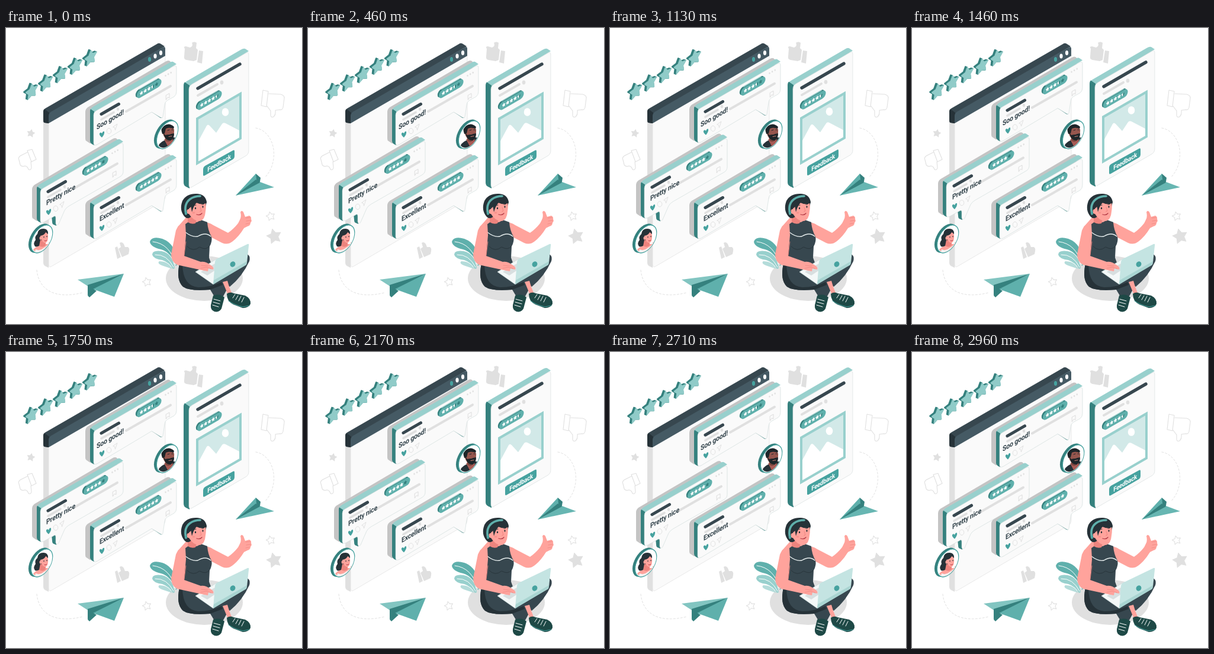
Animation, 500 px wide and 500 px high, one loop 3 s. Source, as an HTML page:

```html
<!DOCTYPE html>
<html lang="en">
<head>
<meta charset="utf-8">
<title>Customer feedback</title>
<style>
html, body { margin: 0; width: 100%; height: 100%; overflow: hidden; background: #fff; }
svg { display: block; width: 100%; height: 100%; }
text { font-family: Roboto, "Liberation Sans", sans-serif; font-weight: 600; letter-spacing: -.25px; }
</style>
</head>
<body>
<svg id="stage" viewBox="0 0 500 500"></svg>
<script>
const teal = '#46a29f', mid = '#5fb0ac', light = '#98d0cd', dark = '#35817e', navy = '#37474f',
  slate = '#455a64', ink = '#263238', grey = '#e0e0e0', paper = '#fafafa',
  skin = '#ffa39c', blush = '#ed847e', shoe = '#1e4946';

const path = (d, fill, extra = '') => `<path d="${d}" fill="${fill}" ${extra}/>`;
const line = (d, color, width, extra = '') =>
  path(d, 'none', `stroke="${color}" stroke-width="${width}" stroke-linecap="round" stroke-linejoin="round" ${extra}`);
const oval = (x, y, rx, ry, fill, extra = '') =>
  `<ellipse cx="${x}" cy="${y}" rx="${rx}" ry="${ry}" fill="${fill}" ${extra}/>`;
const move = (x, y, body) => `<g transform="translate(${x} ${y})">${body}</g>`;
const iso = (x, y, body) => `<g transform="matrix(.866 -.5 0 1 ${x} ${y})">${body}</g>`;
const label = (x, y, size, color, text, anchor = 'start') =>
  iso(x, y, `<text font-size="${size}" fill="${color}" text-anchor="${anchor}">${text}</text>`);

function star(r, half = false) {
  const points = [];
  for (let i = half ? 5 : 0; i <= (half ? 10 : 9); i++) {
    const a = i * Math.PI / 5, q = i % 2 ? r * 0.52 : r;
    points.push((q * Math.sin(a)).toFixed(2) + ' ' + (-q * Math.cos(a)).toFixed(2));
  }
  return 'M' + points.join('L') + 'Z';
}

function badge(x, y, score) {
  const pill = fill => `<rect x="-24" y="-6.5" width="48" height="13" rx="6.5" fill="${fill}"/>`;
  let out = iso(x - 1.4, y - .8, pill(dark) + line('M-16 -5.8H18', light, 1.4)) + iso(x + .8, y + .4, pill(mid));
  for (let i = 0; i < 5; i++) {
    const left = score - i;
    out += iso(x + .6 + (i - 2) * 6.4, y - (i - 2) * 3.7 + .5,
      path(star(3.7), left >= 1 ? '#fff' : dark) +
      (left === .5 ? path(star(3.7, true), '#fff') : ''));
  }
  return out;
}

function card(title, titleX, score, tailLeft) {
  const front = tailLeft
    ? 'V111Q288 117 283 120L196 170Q191 173 189 177L179 200Q175 205 174 199V190Q174 185 170 188L154 197'
    : 'V107Q288 113 284 116L273 122Q268 125 268 130L265 150Q264 153 261 151L246 142L154 197';
  const tailSide = tailLeft
    ? 'M167 186L175 183V203L170 201Q168 200 168 196Z' : 'M245 141L251 138L264 152L261 152Z';
  return path('M134 142Q134 137 138 134L269 57Q275 53 278 57V100L142 195L136 191Q134 190 134 187Z', '#c4c4c4') +
    path(tailSide, dark) +
    path('M142 141Q142 136 147 133L278 57.500Q281 56 283 57.500L288 61L153 142L148 146Z', light) +
    path('M142 140Q142 138 143 137L149 141V198L145 196Q142 194 142 191Z', dark) +
    path(`M148 147Q148 142 152 140L283 64.500Q288 62 288 67${front}Q148 200 148 194Z`, paper,
      'stroke="#cbd8d7" stroke-width=".6"') +
    line('M161 145.5L190.500 128.500', navy, 5) +
    line('M161 154.500L182 142.500', grey, 3.6) + oval(189, 137, 2.2, 2.8, grey) +
    line('M203 141L278 98', grey, 4) +
    badge(241, 102, score) +
    [0, 1, 2].map(i => oval(269.5 + i * 4.6, 80.5 - i * 2.6, 1.2, 1.6, grey)).join('') +
    line('M270.5 113.500L276 110.500V118L273.300 117L270.500 121Z', '#d6d6d6', .8) +
    label(titleX, 169 - (titleX - 158) * .577, 12.2, navy, title) +
    path('M162 185Q157 181 158 178Q160 175 162 178Q164 173 166 175Q167 179 162 185Z', teal) +
    oval(174, 174, 3.8, 4.6, 'none', 'stroke="#dedede" stroke-width=".9"') +
    line('M181 167L188 162L184.500 172.500L183.500 168.500Z', '#dedede', .9);
}

function browser() {
  return path('M63 156L72 160V405L66 402Q63 400 63 396Z', grey) +
    path('M72 160L269 46V283Q269 290 264 293L78 402Q72 406 72 399Z', paper, 'stroke="#e0e0e0" stroke-width=".7"') +
    path('M63 142Q63 138 66 136L255 27Q258 25 261 26.500L268 31L74 145L72 161L65 160Q63 159 63 156Z', navy) +
    path('M63 142Q63 138 65 137L73 143L72 161L65 160Q63 159 63 156Z', ink) +
    path('M72 149Q72 144 76 141.500L264 33Q269 30 269 35V47L72 161Z', slate) +
    oval(242.5, 53, 2.6, 4, teal) + oval(252, 47.5, 2.6, 4, '#fff') + oval(261.5, 42, 2.6, 4, '#fff');
}

function feedback() {
  return path('M300 98Q300 93 305 90L397 36.500Q401 34 404 35L410 39L316 97L309 102Z', light) +
    path('M300 98Q300 93 302 91.500L310 97V271L304 268Q300 266 300 261Z', dark) +
    path('M309 104Q309 98 314 95L405 42.500Q410 39 410 45V207Q410 213 405 216L315 268Q309 272 309 265Z',
      paper, 'stroke="#d9dfdf" stroke-width=".7"') +
    line('M324 102L395 61', navy, 5.4) +
    line('M324 114L357 95', grey, 4) + oval(364.5, 92, 2.8, 3.4, grey) +
    badge(343, 122, 4.5) +
    path('M321 152L398 107.500V187.500L321 232Z', light) +
    path('M325 154.500L394 114.500V185L325 225Z', '#d2e9e8') +
    path('M325 191L339 165Q341 162 344 165L355 177L365 162Q367 159 371 161L394 173V185L325 225Z', '#fff') +
    oval(370.5, 142, 5.8, 6.8, '#fff') +
    path('M333 238Q333 235 336 233L383 207Q386 205 386 208V217Q386 220 383 222L336 249Q333 251 333 248Z', teal) +
    label(360, 232, 11, '#fff', 'Feedback', 'middle');
}

function avatar(x, y, face) {
  return iso(x - 2, y - .8, `<circle r="22" fill="${dark}"/>`) +
    iso(x + 1.6, y + .4, `<circle r="21" fill="#fff" stroke="${teal}" stroke-width="1.300"/>`) +
    `<clipPath id="clip${x}"><circle r="19.500" transform="matrix(.866 -.5 0 1 ${x + 1.6} ${y + .4})"/></clipPath>` +
    `<g clip-path="url(#clip${x})">${face}</g>`;
}

const man = path('M252 211L259 196Q264 191 269 189L281 185Q287 184 295 188V212Z', ink) +
  path('M267 188L280 184L282 190L275 203Z', '#a95b55') +
  path('M268 184L280 181V189Q276 194 270 191Z', '#7a463f') +
  path('M265 171Q267 164 277 165Q285 166 284 176Q284 186 277 189Q268 189 265 179Z', '#96564e') +
  path('M264 179Q260 169 267 165Q276 159 284 167L283 170Q275 167 270 170L268 178Z', '#1d2529') +
  path('M266 177L269 181Q272 180 276 180Q281 178 284 178Q284 187 278 190Q268 190 266 177Z', '#1d2529') +
  line('M275 183.500L280 182.500', '#c77c72', 1.2) +
  line('M273 173L276 172M280 172L282 172', '#1d2529', 1);

const girl = path('M50 358Q48 352 53 348Q54 339 63 339Q71 339 71 347L66 357L60 366Q56 371 49 369Q45 364 50 358Z', ink) +
  path('M43 381Q45 371 56 368L66 365Q77 364 81 369V388H43Z', skin) +
  path('M46 388L50 374Q57 377 63 372L70 367L78 364V388Z', '#f4f4f4') +
  path('M58 358L67 360V367Q63 372 56 368Z', blush) +
  path('M58 351Q65 350 67 345Q72 347 71 355Q70 363 66 363Q60 362 58 351Z', skin) +
  oval(58.5, 355, 2, 2.8, skin) +
  line('M64 352.500v1.200M69 351.500v1.200', ink, 1.2) + line('M65 359.500q2 1 4-1', '#b53d48', 1) +
  line('M67 371q5-2 6-9', blush, 1.2);

function thumbs() {
  const outline = d => line(d, grey, 1.1);
  return path('M302 35Q299 31 304 31L311 33Q317 30 314 25Q318 22 322 25L321 34L324 37L322 54L317 56L305 54Q300 53 301 48ZM326 38L333 39L331 60L323 58Z', grey) +
    path('M184 371L188 369L194 387L188 390ZM190 373L194 370L192 363Q196 360 199 365L201 370L206 370Q209 372 208 377L207 382L196 387Z', grey) +
    outline('M434 105L443 107L440 133L431 131ZM444 111L464 112Q471 114 470 119L468 134Q467 139 462 138L455 139Q456 146 452 150Q447 152 447 147L447 140L441 132') +
    outline('M36 207L44 205L51 222L43 226ZM36 210L24 216Q20 219 22 223L24 231Q26 235 32 233Q36 233 38 239Q42 241 43 236L42 226');
}

function scenery() {
  const face = '#90cbc8', join = c => `stroke="${c}" stroke-width="2" stroke-linejoin="round"`;
  let out = '';
  for (let i = 0; i < 5; i++) {
    const x = 42.5 + i * 24.9, y = 107 - i * 14.2;
    out += [3, 2, 1, 0].map(k => iso(x - k + .5, y - k * .4, path(star(12.2), dark, join(dark)))).join('') +
      iso(x + 1, y, path(star(11.8), face, join(face)));
  }
  const spot = (x, y, r, turn, solid) =>
    `<g transform="translate(${x} ${y}) rotate(${turn})">${path(star(r), solid ? grey : 'none',
      `stroke="${grey}" stroke-width="1.100" stroke-linejoin="round"`)}</g>`;
  return out + spot(42, 178, 6.4, 12, true) + spot(453, 352, 12.8, -14, true) +
    spot(238, 429, 7.6, -14, false) + spot(447, 318, 7.6, -14, false) +
    line('M422 169C445 173 457 201 451 226C449 237 444 245 437 253', grey, 1, 'stroke-dasharray="3 3"') +
    line('M52 409C55 438 77 460 130 447', grey, 1, 'stroke-dasharray="3 3"');
}

function planes() {
  return path('M388 283L422 246L430 263Z', mid) +
    path('M422 246L430 253L428 266L424 264Z', dark) +
    path('M388 283L429 260L453 269Z', '#67b6b2') +
    path('M388 283L422 256L429 261Z', dark) +
    path('M121 425L199 415L138 436Z', '#82c5c1') +
    path('M138 434L199 415L147 444L138 452Z', dark) +
    path('M147 441L199 415L183 454Z', mid) +
    path('M138 452L147 441L153 444L141 455Z', dark);
}

function plant() {
  return path('M289 400Q289 365 264 356Q246 351 243 361Q244 370 262 374Q279 379 287 402Z', mid) +
    path('M285 406Q282 381 263 377Q247 375 247 383Q249 390 264 392Q276 396 282 407Z', light) +
    path('M281 407Q274 394 259 394Q254 398 266 402Z', '#b4dcda') +
    line('M248 361Q277 364 287 400M252 383Q272 382 283 404', '#fff', 1);
}

function legs() {
  const laces = d => line(d, '#fff', 1);
  return path('M293 398Q287 426 299 437Q310 445 345 442L351 452L367 453L374 440L366 428L340 400Z', navy) +
    path('M293 398Q287 426 299 437Q310 445 345 442L366 434L364 429Q346 438 325 438Q299 436 298 400Z', ink) +
    path('M340 400L398 381Q415 380 411 394Q399 420 378 437L364 428Z', navy) +
    path('M366 429L374 427L377 437L381 447L375 451L371 441Z', skin) +
    path('M350 452Q361 448 369 455L364 474Q360 481 352 479Q345 476 346 468Z', shoe) +
    path('M373 449Q378 445 384 448L404 452Q414 457 413 466Q410 473 400 473L384 467Q373 462 373 449Z', shoe) +
    laces('M351 458l11 3M350 463l11 3M349 468l10 3') +
    laces('M383 456l4-6M388 459l4-7M393 461l4-8M398 463l4-8') +
    line('M376 461Q386 468 400 471L411 469', teal, 1);
}

function person() {
  return oval(335, 423, 65, 38, grey) + plant() +
    // raised arm
    path('M333 328Q343 328 350 333L375 346Q384 340 392 330L402 338Q393 353 382 361Q374 367 365 363L340 350Z', skin) +
    path('M391 332L395 324Q398 319 396 311Q398 307 401 311L404 319L411 317Q415 319 414 323Q416 326 413 329Q413 334 408 335L400 339Z', skin) +
    line('M405 321l7-1M406 326l7-1M405 331l6-1', blush, .7) +
    legs() +
    // torso
    path('M306 318L319 315L329 325L336 332L304 342L290 336Z', skin) +
    path('M302 332L309 327Q320 332 329 324L340 328Q341 342 347 352Q349 360 344 369L343 388L347 399Q319 413 292 399L301 368Q304 350 302 332Z', navy) +
    line('M303 345Q315 354 324 352Q337 344 346 352', '#e7eeee', 1.3) +
    line('M306 369Q316 379 327 370Q338 376 343 369', ink, .8) +
    // laptop
    path('M320 412L356 390L382 407L350 433Z', '#f4f8f8', 'stroke="#c9dad9" stroke-width=".7"') +
    path('M329 412L356 396L364 402L340 418Z', '#d8dfe0') +
    path('M353 395Q353 392 356 390L408 365Q411 364 410 368L407 396Q407 399 404 401L350 433Z', '#c4e4e2') +
    path('M351 426L407 394L406 400L350 433Z', '#a9d4d1') +
    oval(383, 399, 4.3, 4.8, teal, 'transform="rotate(35 383 399)"') +
    // resting arm
    path('M303 331Q291 330 287 342L279 382Q279 395 289 400L326 408Q335 410 341 411L342 406L350 408Q352 404 345 400Q337 394 329 395L301 385L304 350Z', skin) +
    line('M329 406L338 404L347 407M330 401L341 402', blush, .7) +
    line('M301 384L304 361', blush, .8) +
    // head
    path('M307 315L323 320L320 330Q313 332 307 328Z', blush) +
    path('M302 319Q292 308 298 292Q305 279 323 280Q337 281 339 294L337 302L311 320Q306 323 302 319Z', ink) +
    path('M309 305Q316 300 317 294Q328 298 336 293Q339 300 337 310Q336 324 328 326Q317 327 309 314Z', skin) +
    path('M313 305Q309 289 321 285Q336 283 339 295Q331 300 322 295Q317 300 314 311Z', ink) +
    line('M304 314Q300 297 311 289Q318 284 328 284', mid, 3.6) +
    oval(308.500, 310, 3, 4, skin) + oval(304.500, 312, 1.6, 2.2, teal) +
    oval(320, 304.500, 1.2, 1.7, ink) + oval(332.500, 302, 1.1, 1.7, ink) +
    line('M317 300.500q2-2 4-1.500M331 298l3-.500', ink, 1) +
    line('M328 303L330 309L327.500 310', blush, .9) +
    line('M322 315Q328 317 331 313', '#b53d48', 1.3) +
    oval(317, 312, 2.3, 1.6, blush, 'opacity=".5"');
}

const float = (delay, body) => `<g data-delay="${delay}">${body}</g>`;
const stage = document.getElementById('stage');
stage.innerHTML = scenery() + thumbs() + planes() + browser() +
  float(500, card('Soo good!', 153, 3.5, false)) +
  float(1500, move(0, 158, card('Excellent', 158, 5, false))) +
  float(0, move(-90, 131, card('Pretty nice', 158, 4, true))) +
  float(1000, feedback()) +
  avatar(271, 180, man) + avatar(59, 356, girl) + person();

const floaters = [...stage.querySelectorAll('[data-delay]')];

// Each card waits for its delay, then rises 10px and sinks again at constant speed.
function draw() {
  const t = performance.now() % 3000;
  for (const el of floaters) {
    const phase = Math.max(0, t - el.dataset.delay) / 1500;
    el.setAttribute('transform', `translate(0 ${(-10 * (1 - Math.abs(1 - phase))).toFixed(3)})`);
  }
  requestAnimationFrame(draw);
}
draw();
</script>
</body>
</html>
```
